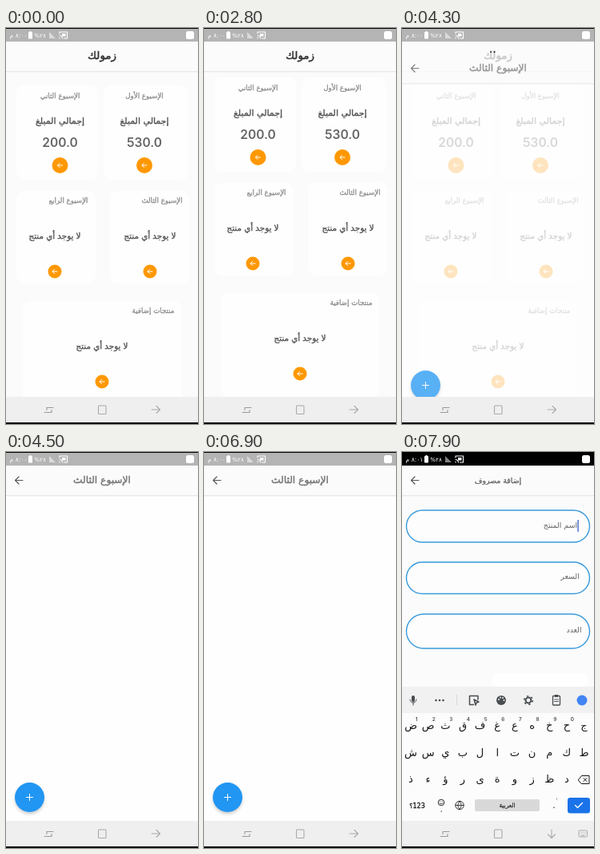
Write an HTML page that moves like this. It is 240 px wide and 496 px high and loops after 8 s.

```html
<!DOCTYPE html>
<html lang="ar">
<head>
<meta charset="utf-8">
<style>
html, body { margin: 0; width: 100%; height: 100%; overflow: hidden; background: #fbfbfb; }
svg { display: block; width: 240px; height: 496px; }
text { font-family: "DejaVu Sans", "Noto Sans", sans-serif; text-anchor: middle; direction: rtl; }
.num { font-family: Inter, sans-serif; direction: ltr; }
.line { fill: none; stroke-linecap: round; stroke-linejoin: round; }
</style>
</head>
<body>
<svg id="stage" viewBox="0 0 240 496"></svg>
<script>
const LOOP = 8000, STEP = 100;

const text = (x, y, size, s, fill = '#555', more = '') =>
  `<text x="${x}" y="${y}" font-size="${size}" fill="${fill}" ${more}>${s}</text>`;
// A regular face with a thin outline: heavier, but still narrow.
const strong = (x, y, size, s, fill = '#555') =>
  text(x, y, size, s, fill, `stroke="${fill}" stroke-width="${size * .035}"`);
const rect = (x, y, w, h, fill, r = 0, more = '') =>
  `<rect x="${x}" y="${y}" width="${w}" height="${h}" rx="${r}" fill="${fill}" ${more}/>`;
const dot = (x, y, r, fill, more = '') => `<circle cx="${x}" cy="${y}" r="${r}" fill="${fill}" ${more}/>`;
const line = (d, stroke, w = 1, more = '') =>
  `<path class="line" d="${d}" stroke="${stroke}" stroke-width="${w}" ${more}/>`;
const group = (id, body) => `<g id="${id}">${body}</g>`;

const header = (title, size, fill, back) =>
  rect(0, 16, 240, 38, '#fbfbfb') + rect(0, 54, 240, 1, '#e8e8e8') + rect(0, 55, 240, 1, '#f5f5f5') +
  strong(120, 39, size, title, fill) +
  (back ? line('M21 35.5H11.5M16 31l-4.5 4.5L16 40', '#555', 1.2) : '');

const goButton = (x, y, r) => dot(x, y, r, '#ff9800') +
  line(`M${x + 3} ${y}h-6m2.5-2.5l-2.5 2.5l2.5 2.5`, '#fff');

const week = (x, y, name) => strong(x, y, 8.7, name, '#8c8c8c');
const total = (x, value) => strong(x, 120, 11, 'إجمالي المبلغ') +
  text(x, 149, 15.5, value, '#666', 'class="num" font-weight="600"') + goButton(x, 172, 10);
const empty = (x, y) => strong(x, y, 10.3, 'لا يوجد أي منتج') + goButton(x, y + 41, 8.5);

function homePage() {
  const cards = [[13, 72, 102, 118], [122, 72, 106, 118], [13, 204, 99, 116], [130, 204, 99, 116], [21, 342, 198, 130]]
    .map(([x, y, w, h]) => rect(x, y, w, h, '#fefefe', 9)).join('');
  return rect(0, 16, 240, 446, '#fbfbfb') +
    group('list', cards +
      week(173, 88, 'الإسبوع الأول') + week(67.5, 88, 'الإسبوع الثاني') +
      total(173, '530.0') + total(67.5, '200.0') +
      week(195, 219, 'الإسبوع الثالث') + week(78, 219, 'الإسبوع الرابع') +
      empty(180, 264) + empty(61, 264) +
      week(184, 357, 'منتجات إضافية') + empty(120, 402)) +
    '<path id="glow" d="M0 55H240V65Q120 82 0 65Z" fill="#e9ecf3"/>' +
    header('زمولك', 13.5, '#333');
}

const weekPage = () => rect(0, 16, 240, 446, '#fefefe') + header('الإسبوع الثالث', 12.2, '#757575', true);

const fab = () => dot(29.5, 435, 18, '#000', 'opacity=".22" filter="url(#soft)"') +
  dot(29.5, 432.5, 18.5, '#2196f3') + line('M25.5 432.5h8M29.5 428.5v8', '#fff');

const field = (y, h, x, label) =>
  rect(5.5, y, 229, h, '#fdfdfd', h / 2, 'stroke="#3a9bdc" stroke-width="1.4"') +
  text(x, y + h / 2 + 1.5, 9.4, label, '#666');

function formPage() {
  return rect(0, 16, 240, 446, '#fbfbfb') + header('إضافة مصروف', 9.4, '#666', true) +
    field(73, 40, 198, 'اسم المنتج') + field(138, 39.5, 210, 'السعر') + field(203, 43, 215, 'العدد') +
    rect(219.3, 85, 1.6, 15, '#5a7fd0') +
    rect(113, 277, 119, 156, '#fff', 7) +
    text(172.5, 346, 8.6, 'إضافة اسعار', '#444') + text(172, 363, 8.6, 'المنتجات كصورة هنا.', '#444') +
    strong(51, 356, 9.6, 'إضافة صورة', '#2d9bdb') +
    line('M83 349v6a3 3 0 0 0 6 0v-7a2 2 0 0 0-4 0v6.5a1 1 0 0 0 2 0v-5', '#2d9bdb', 1.1) +
    rect(81, 459, 79, 24, '#2196e3', 11);
}

function keyboard() {
  const ink = '#161616', grey = '#4a4d50', col = i => 11 + i * 21.65;
  const row = (s, y) => [...s].map((c, i) => text(col(i), y, 13, c, ink)).join('');
  const digits = [...'1234567890'].map((c, i) => text(col(i) + 7, 337, 6.3, c, grey, 'class="num" font-weight="600"')).join('');
  const tools =
    rect(12, 305, 4, 8, grey, 2) + line('M10 310a4 4 0 0 0 8 0M14 314v3', grey) +
    [42.5, 47, 51.5].map(x => dot(x, 311, 1.3, grey)).join('') + rect(68, 304, 1, 13, '#d8d8d8') +
    line('M95 310v-4.5h-10.5v11h5M90 310l6 3l-3 1l-1 3z', grey, 1.5) +
    dot(124, 311, 6, grey) + [[121, 310], [123, 307.5], [126, 308], [127.5, 311]].map(([x, y]) => dot(x, y, 1, '#f1f1f1')).join('') +
    dot(158, 311, 3.4, 'none', `stroke="${grey}" stroke-width="2"`) +
    dot(158, 311, 5.3, 'none', `stroke="${grey}" stroke-width="1.6" stroke-dasharray="2.3 3.25"`) +
    rect(188.5, 305.5, 9, 11.5, 'none', 1, `stroke="${grey}" stroke-width="1.3"`) + rect(191, 304, 4, 3, grey) +
    line('M190.5 310h5M190.5 312.5h5', grey, .9) +
    dot(225, 311, 6.5, '#4285f4');
  const bottom =
    strong(19, 446, 8, '123؟', ink) +
    dot(49, 439, 3.8, 'none', `stroke="${ink}" stroke-width=".9"`) + line('M47 440q2 2 4 0M47.7 437.6v.1M50.3 437.6v.1', ink, .8) +
    text(49, 451, 8, '،', ink) +
    dot(72, 442.5, 5.2, 'none', `stroke="${ink}" stroke-width=".9"`) +
    line('M67 442.5h10M72 437.5q-4.5 5 0 10q4.5-5 0-10', ink, .8) +
    rect(91, 435, 81, 15, '#d9d9d9', 2) + strong(131.5, 445, 7.4, 'العربية', '#333') +
    text(190, 446, 11, '.', ink) + line('M193.5 433.5v2', '#999', .8) +
    rect(207, 433, 28, 19.5, '#1a73e8', 3) + line('M216.5 442.5l3 3l6-6', '#fff', 1.4);
  const erase = line('M220.5 410.5l4-5h9.5v10h-9.5zM227 408.5l4 4m0-4l-4 4', ink, 1);
  return rect(0, 294, 240, 202, '#fcfcfc') + rect(0, 294, 240, 33, '#f1f1f1') + tools + digits +
    row('ضصثقفغعهخحج', 347) + row('شسيبلاتنمكط', 381) + row('ذءؤرىةوزظد', 414) + erase + bottom;
}

const statusBar = () => '<rect id="bar" width="240" height="17"/>' +
  `<text id="clock" x="15.5" y="12" font-size="7.6" fill="#fff"></text>` +
  rect(28, 5, 5, 8.5, '#fff', .8) + rect(29.5, 4, 2, 1.5, '#fff') +
  text(42.5, 12, 7.2, '٢٨%', '#fff') +
  '<path d="M54 5v8h8z" fill="#fff" opacity=".5"/>' +
  line('M67 7v-2h9.5v8h-4M67 9.5a3.5 3.5 0 0 1 3.5 3.5M67 12v1', '#fff', 1.1) +
  rect(70, 7, 4.5, 3.5, '#fff') + rect(225, 4, 10, 10, '#fff', 2.5);

const navBar = () => rect(0, 462, 240, 34, '#efefef') +
  line('M51 478.5v-3h8M57 478.5v3h-9', '#999', 1.1) +
  rect(115.5, 473, 9.5, 10.5, 'none', 1, 'stroke="#aaa" stroke-width="1.1"') +
  group('back', line('M182 478h10.5M188 473.5l4.5 4.5l-4.5 4.5', '#aaa', 1.1)) +
  group('switcher', rect(221, 474, 10.5, 8, 'none', 1, 'stroke="#aaa"') +
    line('M223 476.5h6.5M223 478.5h6.5', '#aaa', 1, 'stroke-dasharray="0 2.1"') + line('M224.5 480.5h3.5', '#aaa'));

const edges = () => rect(0, 0, 240, 1, '#000') + rect(0, 494, 240, 2, '#000');

const stage = document.getElementById('stage');
stage.innerHTML =
  '<defs><filter id="soft" x="-30%" y="-30%" width="160%" height="160%"><feGaussianBlur stdDeviation="2"/></filter></defs>' +
  group('home', homePage()) + group('week', weekPage()) + group('form', formPage()) +
  group('fab', fab()) + group('keys', keyboard()) + navBar() + statusBar() + edges();

const $ = id => document.getElementById(id);
const show = (id, opacity, y = 0) => {
  $(id).setAttribute('opacity', opacity);
  $(id).setAttribute('transform', `translate(0 ${y})`);
};

// Each track is a start time and one value per step; the last one holds.
const tracks = {
  scroll: [2200, [0, -1, -4, -7, -9, -10, -10, -8, -4, 0]],
  glow: [3100, [0, .6, .9, .85, .75, .6, .45, .3, .15, 0]],
  week: [4000, [0, .1, .4, .75, .95, 1]],
  form: [6900, [0, .08, .3, .6, .85, .97, 1]],
  fab: [6900, [1, 1, .9, .6, .4, .2, .12, .09, .06, 0]],
  keys: [7700, [0, .7, 1]]
};
const at = (name, t) => {
  const [start, values] = tracks[name];
  const i = Math.round((t - start) / STEP);
  return values[Math.max(0, Math.min(values.length - 1, i))];
};

function draw(now) {
  const t = Math.floor((now % LOOP) / STEP) * STEP;
  const week = at('week', t), form = at('form', t), keys = at('keys', t);
  show('list', 1, at('scroll', t));
  show('glow', at('glow', t));
  show('week', week, (1 - week) * 60);
  show('form', form, (1 - form) * 60);
  show('fab', Math.min(week, at('fab', t)), (1 - week) * 60);
  show('keys', keys ? 1 : 0, (1 - keys) * 168);
  const typing = t >= 7500;
  $('back').setAttribute('transform', typing ? 'rotate(90 187 478)' : '');
  show('switcher', typing ? 1 : 0);
  $('bar').setAttribute('fill', t >= 7600 ? '#000' : '#b5b4b4');
  $('clock').textContent = t >= 7800 ? '٨:٠١ م' : '٨:٠٠ م';
  requestAnimationFrame(() => draw(performance.now() - origin));
}
const origin = performance.now();
draw(0);
</script>
</body>
</html>
```
